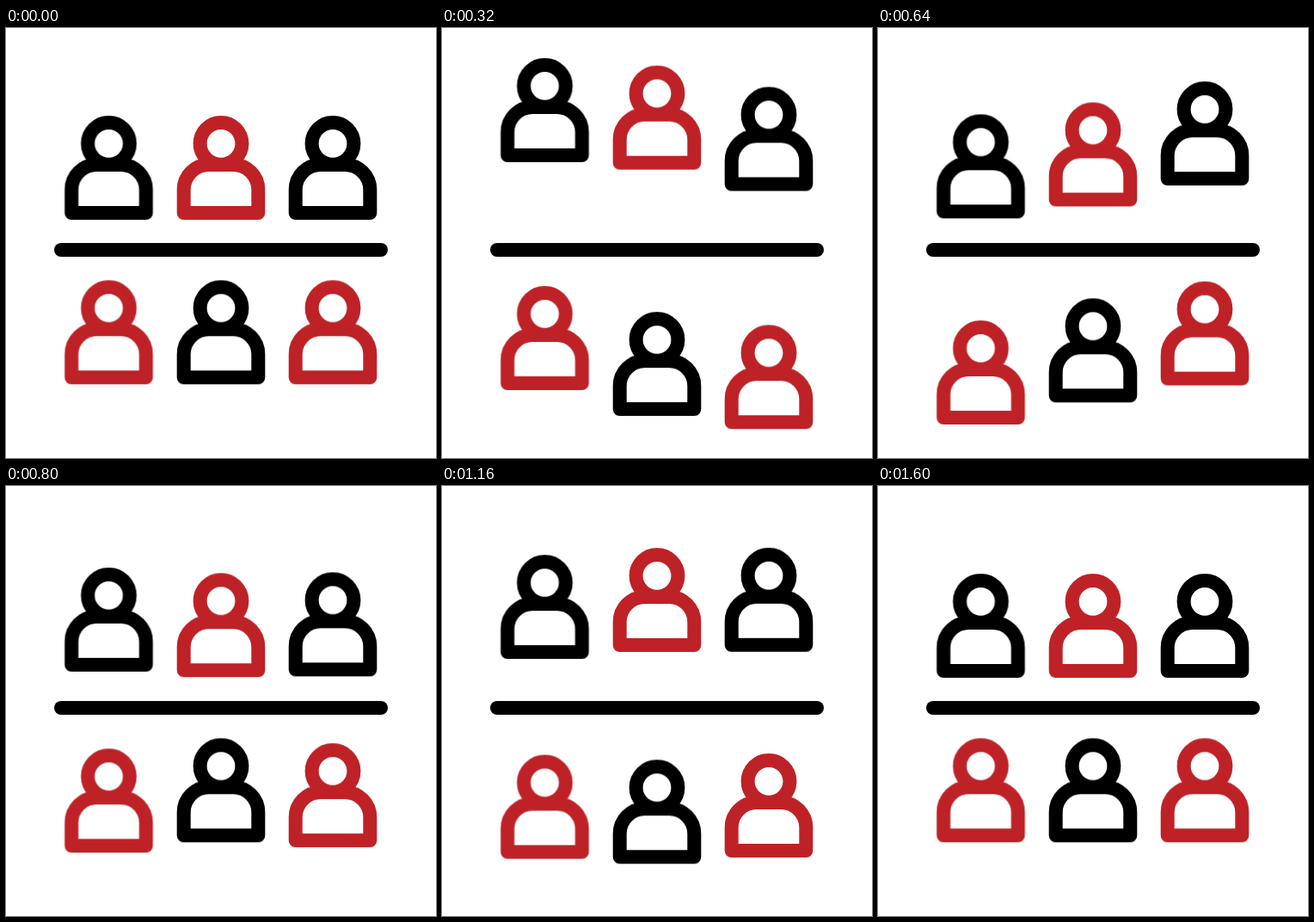
These frames come from a looping animation (500 px wide and 500 px high, 2 s). An HTML page:

```html
<!DOCTYPE html>
<html lang="en">
<head>
<meta charset="utf-8">
<title>Two rows of people</title>
<style>
  html, body { margin: 0; width: 100%; height: 100%; overflow: hidden; background: #fff; }
  svg { display: block; width: 100vw; height: 100vh; }
  g, line { fill: none; stroke-width: 16; stroke-linecap: round; stroke-linejoin: round; }
</style>
</head>
<body>
<svg id="stage" viewBox="0 0 500 500">
  <defs>
    <g id="person">
      <circle cy="134.3" r="24.4"/>
      <path d="M-43.3 215V188a29 29 0 0 1 29 -29H14.3a29 29 0 0 1 29 29V215Z"/>
    </g>
  </defs>
  <line x1="64" y1="258" x2="436" y2="258" stroke="#000"/>
</svg>
<script>
const LOOP = 2000, STEP = 40;
const BLACK = '#000', RED = '#be2227';
const SVG = 'http://www.w3.org/2000/svg';
const stage = document.getElementById('stage');

// x, row y, colour, delay, first hop, second hop
const people = [
  [119.5, 0, BLACK, 0, -67, -31],
  [250, 0, RED, 80, -67, -31],
  [380, 0, BLACK, 160, -67, -31],
  [119.5, 191.3, RED, 240, 52, 25],
  [250, 191.3, BLACK, 120, 52, 25],
  [380, 191.3, RED, 0, 52, 25]
];

function addPerson([x, y, color, delay, hop1, hop2]) {
  const group = document.createElementNS(SVG, 'g');
  const use = document.createElementNS(SVG, 'use');
  use.setAttribute('href', '#person');
  group.setAttribute('stroke', color);
  group.append(use);
  stage.append(group);

  const key = (time, dy) => ({
    offset: time / LOOP,
    transform: `translate(${x}px, ${y + dy}px)`,
    easing: 'ease-in-out'
  });
  const hops = [[0, 0], [320, hop1], [680, 0], [1040, hop2], [1360, 0]]
    .map(([time, dy]) => key(delay + time, dy));
  const frames = [...(delay ? [key(0, 0)] : []), ...hops, key(LOOP, 0)];
  const motion = group.animate(frames, { duration: LOOP, fill: 'both' });
  motion.pause();
  return motion;
}

const motions = people.map(addPerson);

// The motion advances in 40 ms steps.
function draw() {
  const time = Math.floor(performance.now() % LOOP / STEP) * STEP;
  for (const motion of motions) motion.currentTime = time;
  requestAnimationFrame(draw);
}
draw();
</script>
</body>
</html>
```
